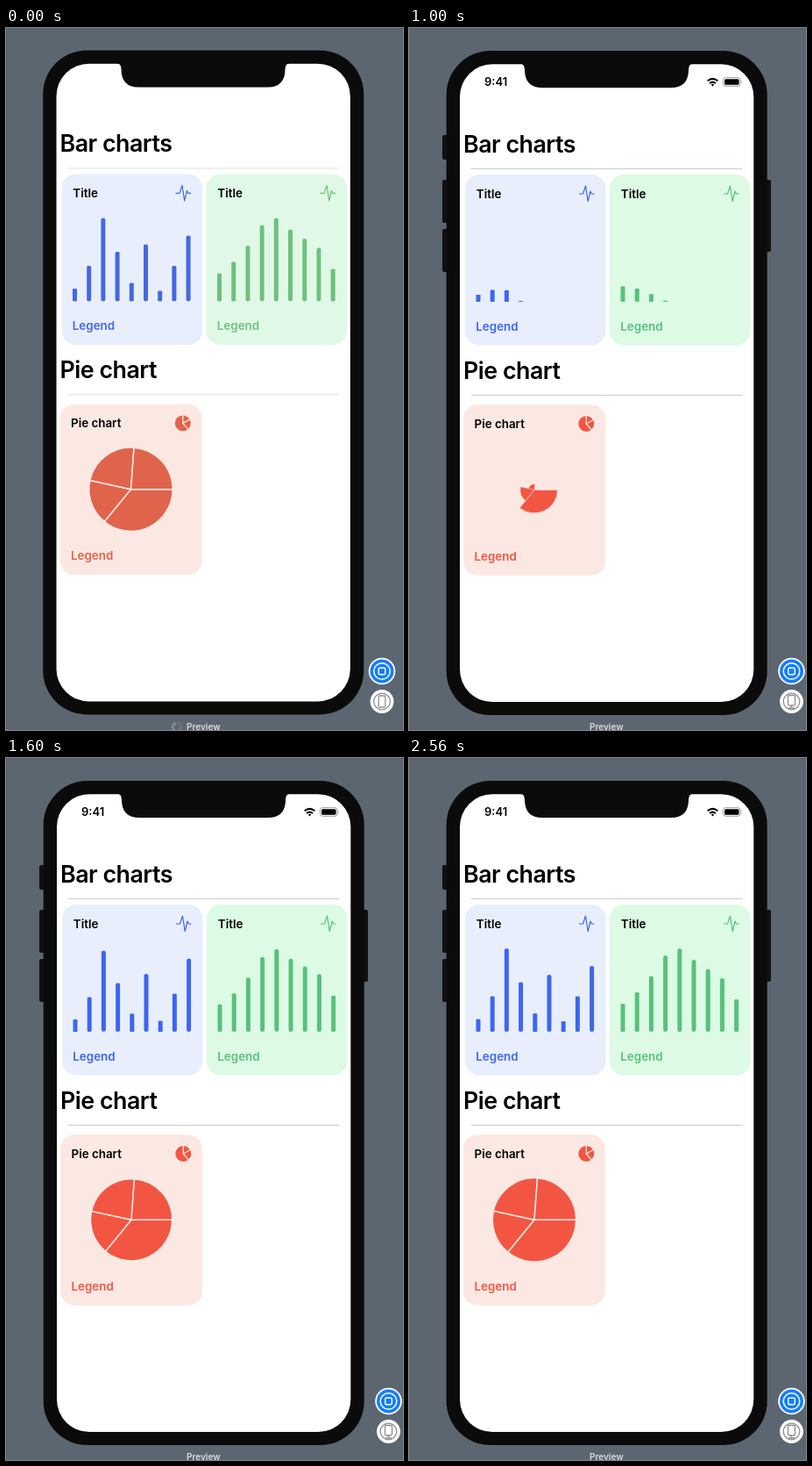
Animation of 453 by 800 pixels, one loop 2.6 s. Source, as an HTML page:

```html
<!DOCTYPE html>
<html lang="en">
<head>
<meta charset="utf-8">
<title>Chart cards</title>
<style>
  html, body { margin: 0; width: 100%; height: 100%; overflow: hidden; background: #5c6671; }
  svg { display: block; width: 453px; height: 800px; font: 600 13.4px Inter, sans-serif;
        --blue: #4468e0; --green: #6fc080; --red: #e0644c; --mint: #e0f9e6; --line: #dcdfe0; }
  svg.live { --blue: #3d66f0; --green: #58c17c; --red: #f25643; --mint: #dcfae4; --line: #cbcbcb; }
  .heading { font-size: 26.8px; letter-spacing: -.5px; }
  .on { display: none; }
  .live .on { display: inline; }
  .live .off { display: none; }
  .rule { stroke: var(--line); }
  .stroke { fill: none; stroke: currentColor; }
  .slice { fill: var(--red); stroke: #fce8e3; stroke-width: 1.5; }
</style>
</head>
<body>
<svg id="stage" viewBox="0 0 453 800">
  <rect width="453" height="800" fill="#5c6671"/>
  <rect width="453" height="1" fill="#535d68"/>
  <g id="phone">
    <path class="on" fill="#111" d="M40 122h4v28h-4q-2 0-2-2v-24q0-2 2-2zM40 173h4v49h-4q-2 0-2-2v-45q0-2 2-2zM40 229h4v49h-4q-2 0-2-2v-45q0-2 2-2zM408 173h3q2 0 2 2v78q0 2-2 2h-3z"/>
    <rect x="42.7" y="26" width="366" height="757" rx="50" fill="#0b0b0b"/>
    <rect x="58" y="41.3" width="335.3" height="726.7" rx="37" fill="#fff"/>
    <path fill="#0b0b0b" d="M126 40.5q6 0 6 7q0 20.500 20 20.500h147q20 0 20-20.500q0-7 6-7z"/>
    <g class="on">
      <text x="86" y="66" font-size="13">9:41</text>
      <g class="stroke" stroke-width="2">
        <path d="M340.700 60.300q5.800-4.800 11.600 0M343 63q3.500-2.800 7 0"/>
      </g>
      <path d="M344.600 64.300q1.900-1.300 3.800 0l-1.900 2.200z"/>
      <rect x="358.500" y="56.700" width="19.500" height="9.600" rx="2.700" fill="none" stroke="#999"/>
      <rect x="360" y="58.200" width="16.500" height="6.600" rx="1.500"/>
      <path d="M379 60q1.500 1.500 0 3z" fill="#999"/>
    </g>
    <text class="heading" x="62" y="141.700">Bar charts</text>
    <text class="heading" x="62" y="399.700">Pie chart</text>
    <path class="rule" d="M71 160.500H380.500M71 418.500H380.500"/>
    <g id="bars"></g>
    <rect x="62" y="429.300" width="162" height="194.400" rx="16" fill="#fce8e3"/>
    <text x="74.500" y="455.700">Pie chart</text>
    <text x="74.500" y="607" fill="var(--red)">Legend</text>
    <circle cx="202.300" cy="451" r="9" fill="var(--red)"/>
    <path d="M202.300 442v9l8-4.500M202.300 451l6 7" fill="none" stroke="#fce8e3" stroke-width="1.300"/>
    <g id="pie" transform="translate(143 526.300)"></g>
  </g>
  <g id="tools" fill="none">
    <circle cy="733" r="15.300" fill="#fff"/>
    <circle cy="733" r="13.500" fill="#147efb"/>
    <circle cy="733" r="9.300" stroke="#fff" stroke-width="1.500"/>
    <rect x="-3.800" y="729.200" width="7.600" height="7.600" rx="1.500" stroke="#fff" stroke-width="1.400"/>
    <circle cy="767.500" r="13.400" fill="#fff"/>
    <g stroke="#8e8e8e" stroke-width="1.300">
      <circle cy="767.500" r="9.300"/>
      <rect class="off" x="-3.800" y="761" width="7.600" height="13" rx="1.500" fill="#fff"/>
      <g class="on">
        <rect x="-4" y="760.500" width="8" height="11.500" rx="1.500" fill="#fff"/>
        <path d="M0 772v3M-3.500 775h7"/>
      </g>
    </g>
  </g>
  <g id="spinner" class="off" transform="translate(195 797)" stroke="#c9ced3" stroke-linecap="round"></g>
  <text x="206" y="800" font-size="10" fill="#d8dcdf">Preview</text>
</svg>
<script>
const LOOP = 2600, LIVE_AT = 900, SPRING_START = 870, STAGGER = 38;
const $ = id => document.getElementById(id);

function add(parent, tag, attrs, text = '') {
  const el = document.createElementNS('http://www.w3.org/2000/svg', tag);
  for (const key in attrs) el.setAttribute(key, attrs[key]);
  el.textContent = text;
  return parent.appendChild(el);
}

function barCard(x, color, background, heights) {
  const card = add($('bars'), 'g', { transform: `translate(${x} 167)` });
  const fill = `var(--${color})`;
  add(card, 'rect', { width: 160.5, height: 194.5, rx: 16, fill: background });
  add(card, 'text', { x: 12.8, y: 26.7 }, 'Title');
  add(card, 'text', { x: 12.3, y: 178, fill }, 'Legend');
  add(card, 'path', { d: 'M130 22h4.500l3-9 2.700 17.500 2.800-11.500 1.500 3h3',
    fill: 'none', stroke: fill, 'stroke-width': 1.2, 'stroke-linejoin': 'round' });
  return heights.map((height, i) => ({
    el: add(card, 'rect', { x: 12.5 + 16.2 * i, y: -95, width: 5, height: 95, rx: 2.5, fill }),
    height, i
  }));
}

const bars = [
  ...barCard(64, 'blue', '#e8eefc', [14.5, 40.5, 95, 56.5, 21, 65, 12, 40.5, 75]),
  ...barCard(229, 'green', 'var(--mint)', [32, 45, 63.5, 87, 95, 82, 71.5, 61, 37])
];

const angles = [0, 129.4, 192.3, 274.3, 360];
const rim = deg => {
  const a = deg * Math.PI / 180;
  return `${47.7 * Math.cos(a)} ${47.7 * Math.sin(a)}`;
};
const slices = angles.slice(1).map((end, i) => add($('pie'), 'path', {
  class: 'slice', d: `M0 0L${rim(angles[i])}A47.7 47.7 0 0 1 ${rim(end)}Z`
}));

const spokes = Array.from({ length: 12 }, (_, i) =>
  add($('spinner'), 'path', { d: 'M0-3.500V-6.500', transform: `rotate(${i * 30})` }));

// Underdamped spring from 0 to 1, damping ratio 0.5
function spring(ms) {
  if (ms <= 0) return 0;
  const decay = 10.7 / 2 * ms / 1000, phase = decay * Math.sqrt(3);
  return 1 - Math.exp(-decay) * (Math.cos(phase) + Math.sin(phase) / Math.sqrt(3));
}

function draw() {
  const t = performance.now() % LOOP, live = t >= LIVE_AT;
  const grow = i => live ? spring(t - SPRING_START - i * STAGGER) : 1;
  $('stage').classList.toggle('live', live);
  $('phone').setAttribute('transform', live ? '' : 'translate(-.5 -.6)');
  $('tools').setAttribute('transform', `translate(${live ? 436.5 : 429} 0)`);
  for (const { el, height, i } of bars)
    el.setAttribute('transform', `translate(0 145) scale(1 ${height / 95 * grow(i)})`);
  slices.forEach((el, i) => el.setAttribute('transform', `scale(${grow(i)})`));
  const step = Math.floor(t / 83);
  spokes.forEach((el, i) => el.setAttribute('opacity', 0.15 + 0.06 * ((i - step % 12 + 12) % 12)));
  requestAnimationFrame(draw);
}
draw();
</script>
</body>
</html>
```
